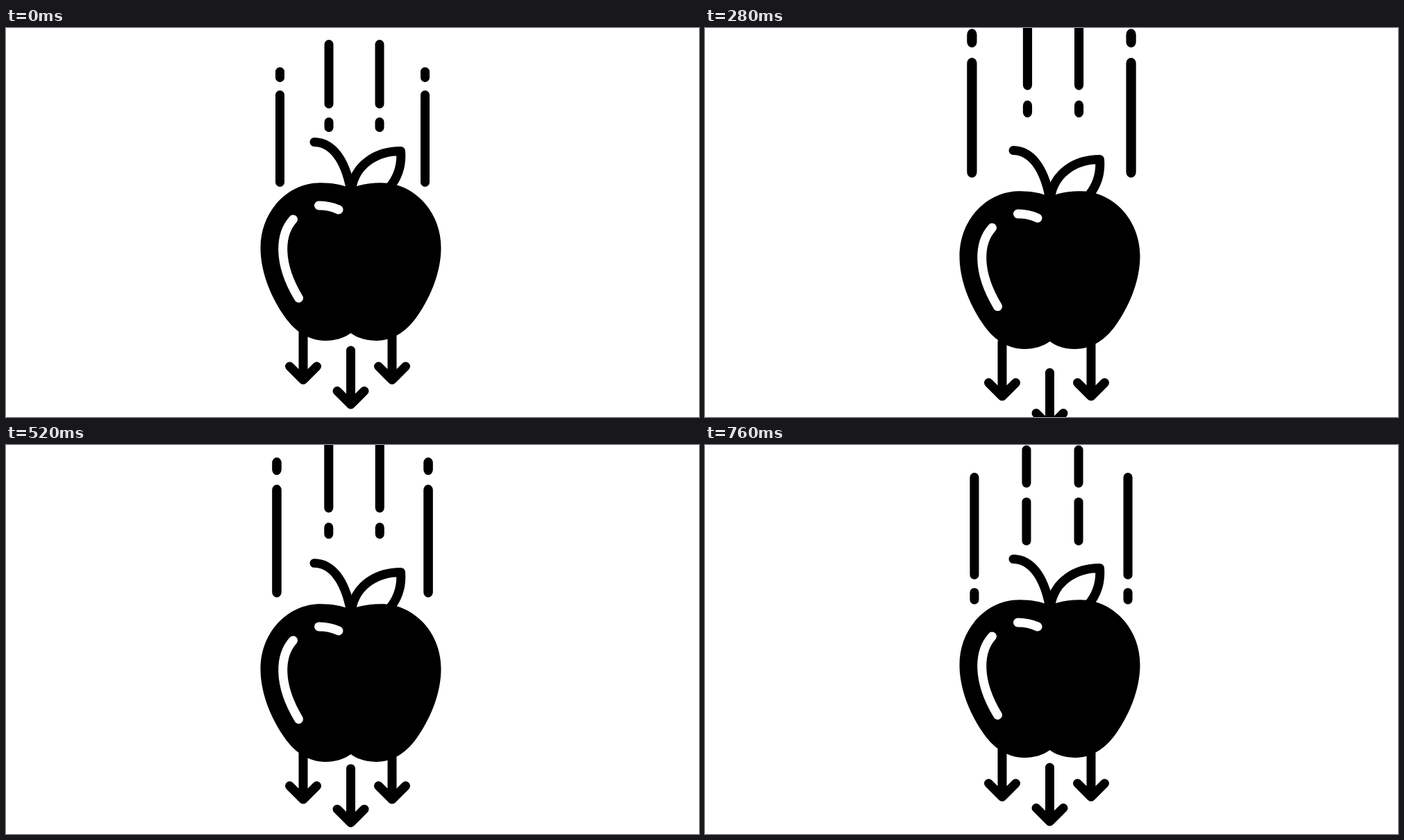
These frames come from a looping animation (998x561 px, 800 ms). An HTML page:

```html
<!DOCTYPE html>
<html lang="en">
<head>
<meta charset="utf-8">
<title>Falling apple</title>
<style>
  html, body { margin: 0; width: 100%; height: 100%; overflow: hidden; background: #fff; }
  svg { display: block; width: 100%; height: 100%; }
  .ink { fill: none; stroke: #000; stroke-width: 13; stroke-linecap: round; stroke-linejoin: round; }
  .shine { stroke: #fff; }
</style>
</head>
<body>
<svg viewBox="0 0 998 561">
  <defs>
    <path id="arrow" d="M0 -78V0M-19.5 -19.5L0 0L19.5 -19.5"/>
  </defs>
  <g class="ink">
    <g id="trails"></g>
    <g id="sides">
      <use href="#arrow" x="428" y="507.5"/>
      <use href="#arrow" x="556" y="507.5"/>
    </g>
    <g id="middle"><use href="#arrow" x="496.5" y="543"/></g>
    <g id="apple">
      <path fill="#000" stroke="none" d="M496.5 231C484 226 469 223.3 453 223.3C405 223.3 366.5 265 366.5 317
        C366.5 350 380 385 399 413C414 436 435 451 460 451C474 451 487 447 496.5 440
        C506 447 519 451 533 451C558 451 579 436 594 413C613 385 626.5 350 626.5 317
        C626.5 265 588 223.3 540 223.3C524 223.3 509 226 496.5 231Z"/>
      <path d="M444 164.5C470 165 488 190 496 231"/>
      <path d="M498 229C504 198 532 177.5 568.5 177.5C570 196 566 213 553 229"/>
      <path class="shine" d="M450.5 256Q466 256 479 262M413.5 276C394.5 297 390.5 338 421.5 389.5"/>
    </g>
  </g>
</svg>
<script>
const LOOP = 800, STEP = 40, START = 40, LATE = 600, CAP = 6.5, BASE = 283;
const $ = id => document.getElementById(id);

const progress = (t, a, b) => Math.min(1, Math.max(0, (t - a) / (b - a)));
const smooth = u => u * u * (3 - 2 * u);

// Eases up to 1 at `top`, stays until `leave`, then eases back to 0 at `end`.
const hump = (t, top, leave, end) =>
  smooth(progress(t, START, top)) - smooth(progress(t, leave, end));

// Each pair of trails: centre, half distance, then where each dash starts and stops.
const sets = [
  [[499, 104.5, 56.5, 78, 90, 229], [501.5, 36.5, 17, 116, 129, 150]],
  [[500, 106.7, 62, 128, 134, 156, 165, 238.5], [503, 38.7, -60, 39, 52, 155]],
  [[498.5, 110, 46, 196, 208, 231], [500.5, 37.5, 5, 65, 79, 147]]
];

function add(tag, parent) {
  const el = document.createElementNS("http://www.w3.org/2000/svg", tag);
  return parent.appendChild(el);
}

function addPair([cx, half, ...ends], parent) {
  const path = add("path", parent);
  const line = x => ends.map((y, i) =>
    i % 2 ? `V${y - CAP - BASE}` : `M${x} ${y + CAP - BASE}`).join("");
  path.setAttribute("d", line(-half) + line(half));
  return (sx, sy) => path.setAttribute("transform", `translate(${cx} ${BASE}) scale(${sx} ${sy})`);
}

const trails = sets.map(pairs => {
  const g = add("g", $("trails"));
  const [outer, inner] = pairs.map(pair => addPair(pair, g));
  return { g, outer, inner };
});

const shift = (id, y) => $(id).setAttribute("transform", `translate(0 ${y})`);

function draw(t) {
  shift("apple", 12.5 * hump(t, 310, 390, 640));
  shift("sides", 23.7 * hump(t, 290, 275, 600));
  shift("middle", 34 * hump(t, 232, 232, 565));

  const late = t >= LATE;
  const active = late ? 2 : t >= 200 && t < 280 ? 1 : 0;
  const u = progress(t, LATE, LOOP - STEP);
  const sy = late ? 0.025 * u * (2 - u) : 0.28 * hump(t, 350, 400, 680);
  const sx = late ? sy / 5 : 0.097 * hump(t, 290, 290, 720);

  trails.forEach(({ g }, i) => g.setAttribute("visibility", i === active ? "visible" : "hidden"));
  trails[active].outer(1 + sx, 1 + sy);
  trails[active].inner(1 + sx * 0.15, 1 + sy * 0.65);
}

const start = performance.now();
function tick() {
  const t = (performance.now() - start + 3) % LOOP;
  draw(Math.floor(t / STEP) * STEP);
  requestAnimationFrame(tick);
}
tick();
</script>
</body>
</html>
```
